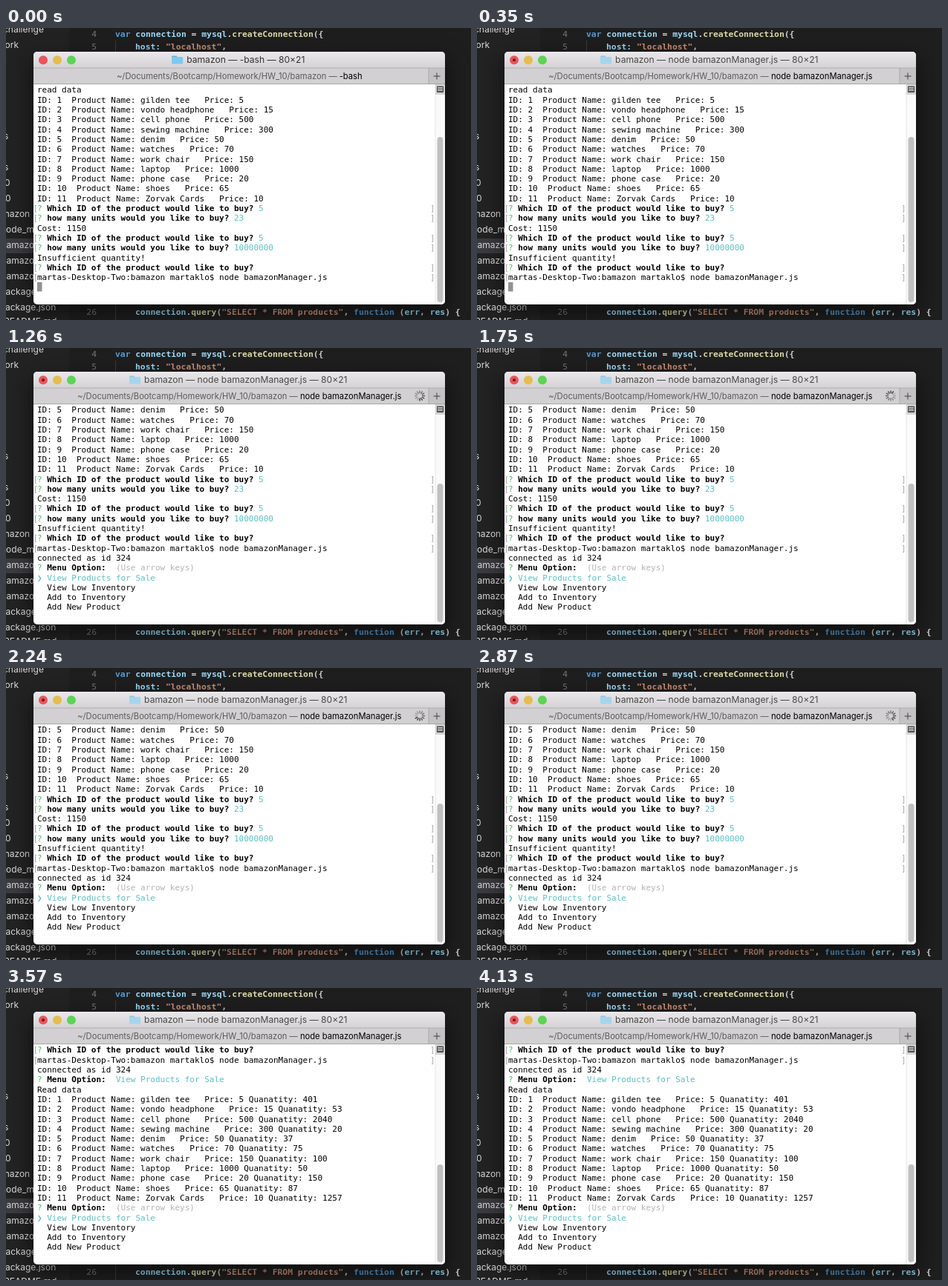
Animation of 626 by 394 pixels, one loop 4200 ms. Source, as an HTML page with a canvas:

```html
<!DOCTYPE html>
<html lang="en">
<head>
<meta charset="utf-8">
<title>Terminal</title>
<style>
html, body { margin: 0; width: 100%; height: 100%; overflow: hidden; background: #1e1e1e; }
canvas { display: block; }
</style>
</head>
<body>
<canvas id="stage" width="626" height="394"></canvas>
<script>
const ctx = document.getElementById('stage').getContext('2d');
const LOOP = 4200, RUN = 210, MENU = 630, RESULT = 2940;
const ROWS = 21, LINE = 13.3;
const MONO = '"DejaVu Sans Mono", monospace', SANS = 'Inter, sans-serif';
const GREEN = '#4cb964', CYAN = '#5bbfc3', GRAY = '#b4b4b4', BLACK = '#000';

// Terminal lines: { parts: [[text, colour, bold]], marked }
const plain = text => ({ parts: [[text]] });
const ask = (text, answer = '', colour = CYAN, marked = true) =>
  ({ parts: [['? ', GREEN], [text, BLACK, true], [' ' + answer, colour]], marked });
const which = answer => ask('Which ID of the product would like to buy?', answer);
const units = answer => ask('how many units would you like to buy?', answer);
const menu = (answer, colour) => ask('Menu Option:', ' ' + answer, colour, false);

const products = [
  ['gilden tee', 5, 401], ['vondo headphone', 15, 53], ['cell phone', 500, 2040],
  ['sewing machine', 300, 20], ['denim', 50, 37], ['watches', 70, 75],
  ['work chair', 150, 100], ['laptop', 1000, 50], ['phone case', 20, 150],
  ['shoes', 65, 87], ['Zorvak Cards', 10, 1257]
];
const listing = full => products.map(([name, price, count], i) =>
  plain(`ID: ${i + 1}  Product Name: ${name}   Price: ${price}` + (full ? ` Quanatity: ${count}` : '')));

const history = [
  plain('read data'), ...listing(false),
  which('5'), units('23'), plain('Cost: 1150'),
  which('5'), units('10000000'), plain('Insufficient quantity!'), which(),
  { parts: [['martas-Desktop-Two:bamazon martaklo$ node bamazonManager.js']], marked: true }
];
const options = [
  menu('(Use arrow keys)', GRAY),
  { parts: [['❯ View Products for Sale', CYAN]] },
  ...['View Low Inventory', 'Add to Inventory', 'Add New Product'].map(s => plain('  ' + s))
];
const connected = [...history, plain('connected as id 324')];
const screens = {
  start: [...history, plain('')],
  menu: [...connected, ...options],
  result: [...connected, menu('View Products for Sale', CYAN), plain('Read data'),
    ...listing(true), ...options]
};

function rect(x, y, w, h, fill, radius = 0) {
  ctx.fillStyle = fill;
  ctx.beginPath();
  ctx.roundRect(x, y, w, h, radius);
  ctx.fill();
}

function dot(x, y, r, fill) {
  ctx.fillStyle = fill;
  ctx.beginPath();
  ctx.arc(x, y, r, 0, 7);
  ctx.fill();
}

// Draws coloured parts one after another
function write(parts, x, y, font, bold) {
  for (const [text, colour = BLACK, strong = bold] of parts) {
    ctx.font = (strong ? 'bold ' : '') + font;
    ctx.fillStyle = colour;
    ctx.fillText(text, x, y);
    x += ctx.measureText(text).width;
  }
}

function widthOf(text, font) {
  ctx.font = font;
  return ctx.measureText(text).width;
}

function drawEditor() {
  rect(0, 0, 626, 394, '#1e1e1e');
  rect(0, 0, 85, 394, '#222223');
  rect(0, 284, 85, 20, '#3a3a40');
  rect(147, 17, 1, 377, '#3c3c3c');

  const files = [
    ['challenge', -4, 6], ['s', -3, 150], ['s', -3, 192], ['0', -2, 213], ['0', -1, 234],
    ['bamazon', -20, 255], ['node_modules', -7, 276],
    ['bamazon.sql', -7, 297], ['bamazonCustomer.js', -7, 318], ['bamazonManager.js', -7, 339],
    ['package-lock.json', -8, 360], ['package.json', -8.5, 380.5], ['README.md', -3, 400]
  ];
  const font = '12px ' + SANS, pale = '#dadada';
  for (const [name, x, y] of files) write([[name, pale]], x, y, font);
  write([['Homework', pale]], 17 - widthOf('Homework', font), 27, font);

  const white = '#d0d0d0', name = '#9cdcfe', call = '#dcdcaa', word = '#569cd6', text = '#ce9178';
  const code = [
    [4, 12, 147, [['var ', word], ['connection', name], [' = ', white], ['mysql', name],
      ['.', white], ['createConnection', call], ['({', white]]],
    [5, 29, 174, [['host:', name], [' ', white], ['"localhost"', text], [',', white]]],
    [26, 387, 174, [['connection', name], ['.', white], ['query', call], ['(', white],
      ['"SELECT * FROM products"', text], [', ', white], ['function', word], [' (', white],
      ['err', name], [', ', white], ['res', name], [') {', white]]]
  ];
  const codeFont = '11.36px ' + MONO;
  for (const [number, y, x, parts] of code) {
    write([[String(number), '#777']], 122 - widthOf(String(number), codeFont), y, codeFont);
    write(parts, x, y, codeFont, true);
  }
}

function drawWindow(running) {
  ctx.save();
  ctx.shadowColor = 'rgba(0,0,0,.6)';
  ctx.shadowBlur = 30;
  ctx.shadowOffsetY = 10;
  rect(37, 32, 554, 341, '#fff', 5);
  ctx.restore();

  const bar = ctx.createLinearGradient(0, 32, 0, 54);
  bar.addColorStop(0, '#eae8ea');
  bar.addColorStop(1, '#d4d2d4');
  rect(37, 32, 554, 22, bar, [5, 5, 0, 0]);
  rect(37, 54, 554, 21, '#d2d0d2');
  rect(569, 54, 22, 21, '#c4c2c4');
  rect(37, 53.5, 554, 1, '#b4b2b4');
  rect(37, 75, 554, 1, '#a9a7a9');
  rect(568.5, 54, 1, 21, '#a9a7a9');
  rect(575.5, 64.4, 9, 1.2, '#555');
  rect(579.4, 60.5, 1.2, 9, '#555');

  ['#ea555a', '#e5bc4f', '#5cd455'].forEach((c, i) => dot(50 + 19 * i, 43.2, 6, c));
  if (running) dot(50, 43.2, 2, '#7a1512');

  const process = running ? 'node bamazonManager.js' : '-bash';
  const title = `bamazon — ${process} — 80×21`;
  const titleFont = '12.1px ' + SANS;
  const left = 322.8 - widthOf(title, titleFont) / 2;
  write([[title, running ? '#484848' : '#333']], left, 47, titleFont);
  rect(left - 20, 37.6, 7, 4, running ? '#93c8e4' : '#5fb4e2', 1);
  rect(left - 20, 39, 15, 9.6, running ? '#a5d5ec' : '#80c8ee', 1);

  const path = '~/Documents/Bootcamp/Homework/HW_10/bamazon — ';
  const tabFont = '11.2px ' + SANS;
  write([[path, '#5c5c5c'], [process, BLACK]],
    314.3 - widthOf(path + process, tabFont) / 2, 69, tabFont);
}

function drawSpinner(t) {
  const step = Math.floor(t / 70);
  for (let i = 0; i < 12; i++) {
    const age = (step - i + 120) % 12;
    ctx.save();
    ctx.translate(557, 64.5);
    ctx.rotate(i * Math.PI / 6);
    rect(-0.7, -7.3, 1.4, 4.2, `rgba(40,40,40,${0.9 - age * 0.06})`, 0.7);
    ctx.restore();
  }
}

function drawScrollbar(top) {
  rect(578, 76, 13, 297, '#fafafa', [0, 0, 5, 0]);
  rect(577.5, 76, 1, 297, '#e6e6e6');
  rect(580.5, top, 8, 370 - top, '#c0c0c0', 4);
  rect(578, 76, 13, 14, '#d4d4d4');
  rect(580, 78.5, 9, 8.5, '#444', 1);
  for (let i = 0; i < 3; i++) rect(581, 80 + 2 * i, 7, 1, '#eee');
}

function drawLines(lines) {
  const font = '11px ' + MONO;
  lines.slice(-ROWS).forEach(({ parts, marked }, i) => {
    const y = 87.4 + i * LINE;
    write(parts, 42, y, font);
    if (marked) {
      write([['[', '#aaa']], 36.5, y, font);
      write([[']', '#aaa']], 571, y, font);
    }
  });
}

function draw(now) {
  const t = now % LOOP;
  const state = t < MENU ? 'start' : t < RESULT ? 'menu' : 'result';
  drawEditor();
  drawWindow(t >= RUN);
  drawScrollbar({ start: 147, menu: 183, result: 238 }[state]);
  drawLines(screens[state]);
  if (state === 'start') rect(42, 343, 6.5, 12.5, '#929292');
  if (state === 'menu') drawSpinner(t);
  requestAnimationFrame(draw);
}
requestAnimationFrame(draw);
</script>
</body>
</html>
```
